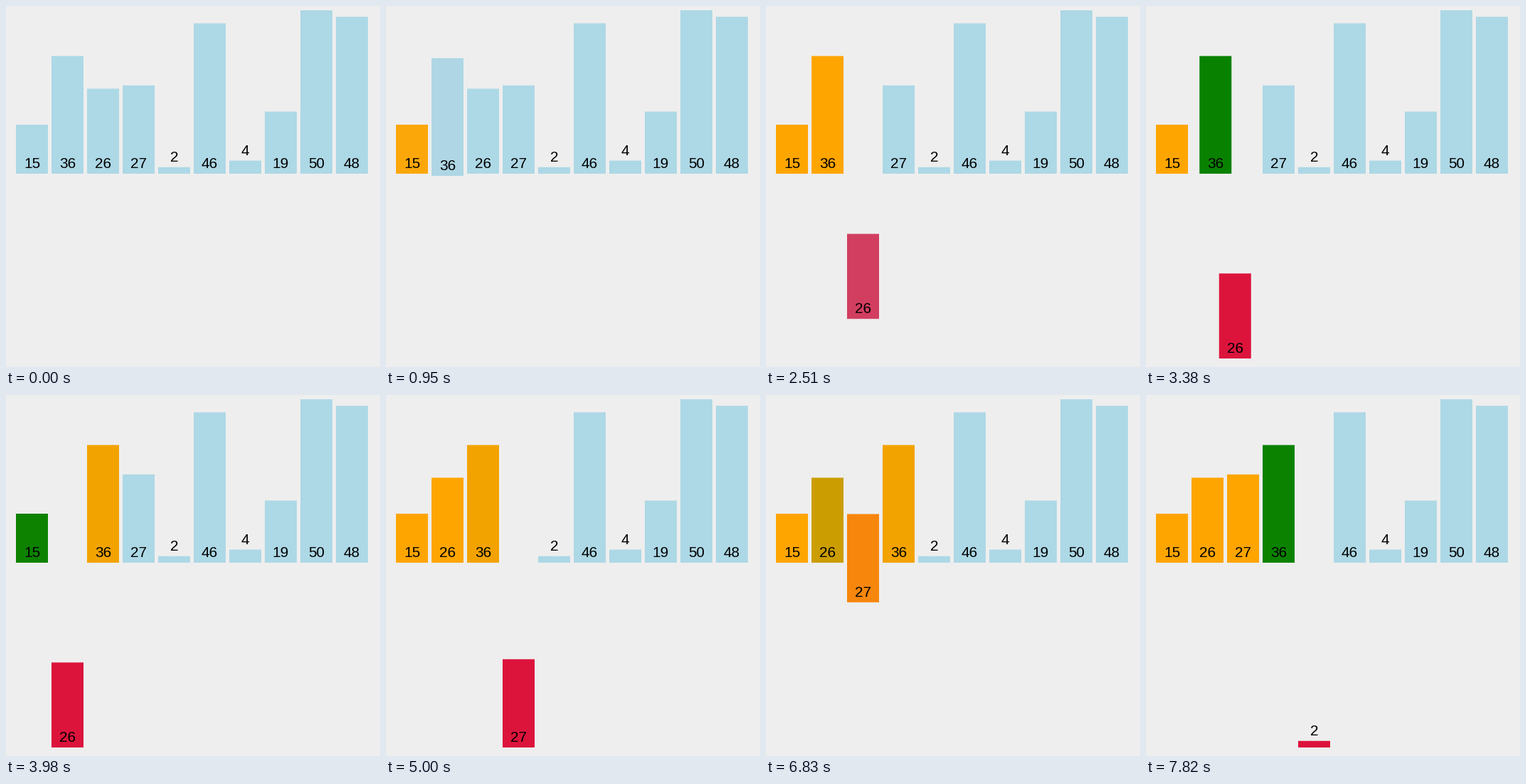
A matplotlib script for the animation above (8000 ms loop, 526 px wide and 508 px high).

```python
import numpy as np
import matplotlib.pyplot as plt
from matplotlib.animation import FuncAnimation
from matplotlib.patches import Rectangle

W, H, DPI = 526, 508, 100
LOOP, INTERVAL, TICK = 8000, 20, 30
BASE, DROP, UNIT = 236, 260, 4.6
LEFT, PITCH, BAR_W = 14, 50, 45
FONT_PX = 20.8

BLUE = (173, 216, 230)
ORANGE = (255, 165, 0)
RED = (220, 20, 60)
GREEN = (0, 128, 0)

VALUES = [15, 36, 26, 27, 2, 46, 4, 19, 50, 48]

# Progress of the first visible tick; a tint's first ticks are too faint to show.
MOVE, LATE_MOVE, TINT = 0.143, 0.08, 0.295
SPEED = 0.12

# start, end, first progress, {value: (colour, slot, row)}; row 1 is the lower one
EVENTS = [
    (500, 620, TINT, {15: (ORANGE, 0, 0)}),
    (950, 1160, MOVE, {36: (RED, 1, 1)}),
    (1460, 1580, TINT, {15: (GREEN, 0, 0)}),
    (1910, 2120, MOVE, {36: (ORANGE, 1, 0), 15: (ORANGE, 0, 0)}),
    (2390, 2600, MOVE, {26: (RED, 2, 1)}),
    (2900, 3020, TINT, {36: (GREEN, 1, 0)}),
    (3320, 3530, MOVE, {36: (GREEN, 2, 0), 26: (RED, 1, 1)}),
    (3860, 3980, TINT, {15: (GREEN, 0, 0), 36: (ORANGE, 2, 0)}),
    (4310, 4520, MOVE, {26: (ORANGE, 1, 0), 15: (ORANGE, 0, 0)}),
    (4760, 5000, LATE_MOVE, {27: (RED, 3, 1)}),
    (5300, 5450, TINT, {36: (GREEN, 2, 0)}),
    (5750, 5960, MOVE, {36: (GREEN, 3, 0), 27: (RED, 2, 1)}),
    (6260, 6380, TINT, {26: (GREEN, 1, 0), 36: (ORANGE, 3, 0)}),
    (6710, 6920, MOVE, {27: (ORANGE, 2, 0), 26: (ORANGE, 1, 0)}),
    (7190, 7400, MOVE, {2: (RED, 4, 1)}),
    (7700, 7820, TINT, {36: (GREEN, 3, 0)}),
]


def ease(p):
    """Cubic in and out."""
    p = min(max(p, 0), 1)
    return 4 * p ** 3 if p < 0.5 else 1 - 4 * (1 - p) ** 3


def pack(colour, slot, row):
    return np.array([*colour, slot, row], float)


def states(ms):
    """Colour, slot and row of every bar at a given time."""
    now = {v: pack(BLUE, i, 0) for i, v in enumerate(VALUES)}
    for start, end, first, changes in EVENTS:
        if ms < start:
            break
        ticks = (min(ms, end) - start) // TICK
        k = ease(first + SPEED * ticks)
        for v, goal in changes.items():
            now[v] += (pack(*goal) - now[v]) * k
    return now


fig = plt.figure(figsize=(W / DPI, H / DPI), dpi=DPI, facecolor="#eeeeee")
ax = fig.add_axes([0, 0, 1, 1])
ax.set(xlim=(0, W), ylim=(H, 0))
ax.axis("off")

bars, labels = {}, {}
for v in VALUES:
    bars[v] = ax.add_patch(
        Rectangle((0, 0), BAR_W, v * UNIT, linewidth=0, snap=False))
    labels[v] = ax.text(0, 0, str(v), family="Liberation Sans",
                        size=FONT_PX * 72 / DPI, color="black",
                        ha="center", va="baseline")


def draw(i):
    # Sample mid-frame so that every tick falls in its own frame.
    now = states(i * INTERVAL + INTERVAL // 2)
    for v, (r, g, b, slot, row) in now.items():
        x, base = LEFT + PITCH * slot, BASE + DROP * row
        tall = v * UNIT
        bars[v].set_xy((x, base - tall))
        bars[v].set_facecolor((r / 255, g / 255, b / 255))
        lift = tall if tall < 25 else 0
        labels[v].set_position((x + BAR_W / 2, base - lift - 8))
    return [*bars.values(), *labels.values()]


anim = FuncAnimation(fig, draw, frames=LOOP // INTERVAL, interval=INTERVAL,
                     repeat=True, repeat_delay=0, blit=False)
plt.show()
```
